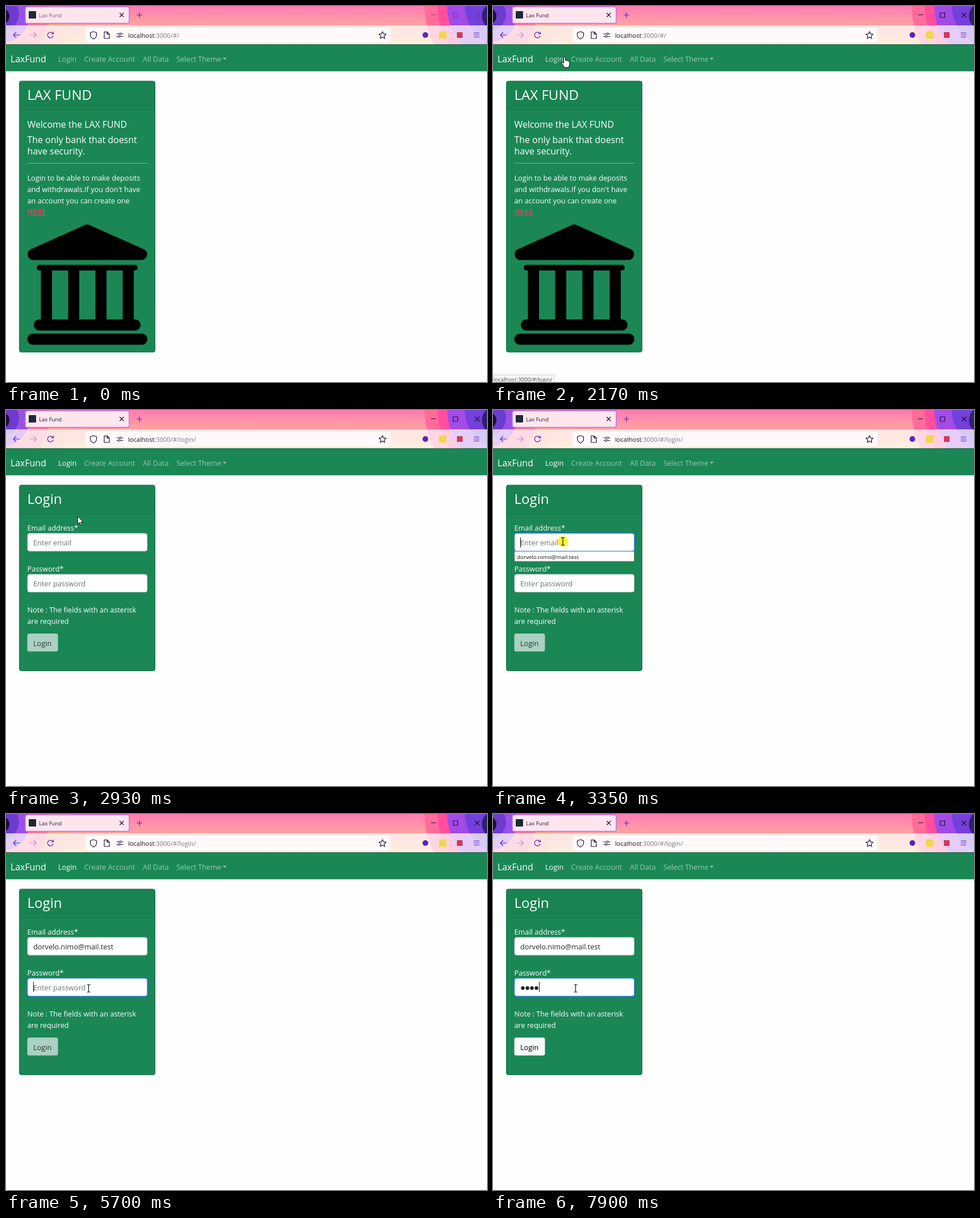
These frames come from a looping animation (847x661 px, 8 s). An HTML page:

```html
<!DOCTYPE html>
<html lang="en">
<head>
<meta charset="utf-8">
<title>Lax Fund</title>
<style>
  html, body { margin: 0; width: 100%; height: 100%; overflow: hidden; background: #fefefe; }
  svg { display: block; width: 847px; height: 661px; }
  text { font-family: "Open Sans", "Noto Sans", sans-serif; white-space: pre; }
  .line { fill: none; stroke-width: 1.2; stroke-linecap: round; stroke-linejoin: round; }
</style>
</head>
<body>
<svg id="stage" viewBox="0 0 847 661"></svg>
<script>
const LOOP = 8000;
const BASE = 12.7, TITLE = 15.9, HEAD = 24.1;
const GREEN = '#1b8755', PURPLE = '#5a22c0', INK = '#20123a';
const EMAIL = 'dorvelo.nimo@mail.test';

const text = (x, y, size, str, fill = '#fff', more = '') =>
  `<text x="${x}" y="${y}" font-size="${size}" fill="${fill}" ${more}>${str}</text>`;
const rect = (x, y, w, h, fill, r = 0, more = '') =>
  `<rect x="${x}" y="${y}" width="${w}" height="${h}" rx="${r}" fill="${fill}" ${more}/>`;
const circle = (x, y, r, fill, more = '') =>
  `<circle cx="${x}" cy="${y}" r="${r}" fill="${fill}" ${more}/>`;
const line = (d, color = PURPLE, more = '') => `<path class="line" d="${d}" stroke="${color}" ${more}/>`;
const group = (id, ...parts) => `<g id="${id}">${parts.join('')}</g>`;

const card = (height, title) =>
  rect(23.5, 132, 239, height, GREEN, 3.5, 'stroke="#15744a"') +
  rect(24, 132, 238, 50, '#000', 3, 'opacity=".03"') +
  rect(24, 182, 238, 1, '#17744a') +
  text(37.5, 165, HEAD, title);

const input = (id, y) =>
  rect(36, y - 1.5, 215, 35, '#146fc0', 5, `id="${id}Ring" opacity="0"`) +
  rect(38, y + .5, 210.5, 31, '#fff', 3.5, `id="${id}Box" stroke="#ced4da"`);

const chrome = [
  `<defs><linearGradient id="sky" x2="0" y2="1">
    <stop offset="0" stop-color="#ff7cb4"/><stop offset=".5" stop-color="#ffa3a0"/>
    <stop offset="1" stop-color="#ffc08c"/></linearGradient>
    <clipPath id="bar"><rect width="847" height="67.5"/></clipPath></defs>`,
  '<g clip-path="url(#bar)">',
  rect(0, 0, 847, 68, 'url(#sky)'),
  circle(-8, 14, 118, '#ffa48c'), circle(-8, 14, 84, '#ff7d9c'),
  circle(-8, 14, 50, '#9a50e4'), circle(-8, 14, 31, '#6d3bd0'), circle(-8, 18, 14, '#1c1038'),
  circle(880, 0, 143, '#ff6c9a'), circle(880, 0, 120, '#ff4f9c'),
  circle(880, 0, 103, '#a24be6'), circle(880, 0, 72, '#7440dc'), circle(862, 18, 24, '#33206e'),
  rect(0, 34, 847, 34, '#fff', 0, 'opacity=".72"'),
  '</g>',
  rect(34, 1.5, 183, 29, '#ffe6ee', 3, 'stroke="#b36cf0" stroke-width="1.4"'),
  rect(40, 9, 13, 13, '#1d2a33', 1),
  text(58, 20, 9.5, 'Lax Fund', INK, 'id="tabTitle"'),
  line('M200.5 12.5l6.5 6.5m0-6.5l-6.5 6.5', INK),
  line('M230.5 16h9m-4.5-4.5v9'),
  group('controls', line('M749 15.5h8M787.5 12h8v8h-8zM826 12l7.5 7.5m0-7.5l-7.5 7.5', 'currentColor', 'stroke-linecap="butt"')),
  line('M24 51H13m4.5-4.5L13 51l4.5 4.5'),
  line('M42.500 51h11m-4.500-4.500l4.500 4.500l-4.500 4.500', PURPLE, 'opacity=".4"'),
  line('M82.500 48.500a5 5 0 1 0 .500 4M83.500 45.500v3.500h-3.500'),
  rect(140, 38, 537, 26, '#fffaf9', 3),
  line('M154 45l5.500 2v4q0 4.500-5.500 7q-5.500-2.500-5.500-7v-4z', INK),
  line('M173 45.500h5l4 4v7.500h-9zm5 0v4h4', INK),
  line('M195 49h4.500m4 0h2.500M195 53.500h2m4 0h5', INK),
  circle(201.5, 49, 1.7, 'none', `stroke="${INK}"`), circle(199, 53.5, 1.7, 'none', `stroke="${INK}"`),
  text(215, 55.5, 11.08, '<tspan fill="#15141a">localhost</tspan>:3000/#/<tspan id="route">login/</tspan>', '#76767c'),
  line('M663 45l1.900 4.100l4.400.5l-3.300 3l.9 4.400l-3.900-2.200l-3.900 2.200l.9-4.400l-3.300-3l4.400-.5z', INK),
  circle(738.5, 51, 5, PURPLE),
  rect(762.5, 44.500, 13, 13, '#efd84a'),
  rect(794, 46, 10, 10, '#d33a54'),
  line('M824 47.500h9m-9 3.500h9m-9 3.500h9'),
];

const nav = [
  rect(0, 67.5, 847, 47.3, GREEN), rect(0, 67.5, 847, 1, '#176c45'),
  text(8, 99, TITLE, 'LaxFund'),
  text(92, 97.5, BASE, 'Login', '#fff', 'id="navLogin"'),
  text(137.5, 97.5, BASE, 'Create Account', '#fff', 'id="navCreate"'),
  text(241, 97.5, BASE, 'All Data', '#fff', 'opacity=".55"'),
  text(300, 97.5, BASE, 'Select Theme', '#fff', 'opacity=".55"'),
  '<path d="M381.500 91h7l-3.500 3.500z" fill="#fff" opacity=".55"/>',
];

const home = group('home',
  card(476.5, 'LAX FUND'),
  text(37.5, 214, TITLE, 'Welcome the LAX FUND'),
  text(37.5, 240.5, TITLE, 'The only bank that doesnt'),
  text(37.5, 260.5, TITLE, 'have security.'),
  rect(38, 276, 211, 1, '#fff', 0, 'opacity=".4"'),
  text(37.5, 306.5, BASE, 'Login to be able to make deposits'),
  text(37.5, 326.5, BASE, "and withdrawals.If you don't have"),
  text(37.5, 346.5, BASE, 'an account you can create one'),
  text(37.5, 366, 13, 'HERE', '#d9435a', 'font-weight="700" text-decoration="underline"'),
  '<path d="M47.500 446.500H239A10 10 0 0 0 243.500 428L147 385Q143 383 139 385L43 428A10 10 0 0 0 47.500 446.500Z"/>',
  rect(54, 455, 178, 10, '#000', 5),
  [61.5, 109.5, 157.5, 205.5].map(x => rect(x, 460, 19.5, 96, '#000')).join(''),
  rect(49, 551, 188, 19.5, '#000', 9.7),
  rect(37.5, 576, 211.5, 19.5, '#000', 9.7));

const login = group('login',
  card(326.5, 'Login'),
  text(37.5, 212, BASE, 'Email address*'),
  input('mail', 216.5),
  text(48, 238, BASE, '', '#212529', 'id="mailText"'),
  text(37.5, 283.5, BASE, 'Password*'),
  input('pass', 288.5),
  text(48, 309.5, BASE, 'Enter password', '#66786f', 'id="passHint"'),
  [0, 1, 2, 3].map(i => circle(52.5 + 8 * i, 306, 3.2, '#212529', `id="dot${i}"`)).join(''),
  rect(0, 0, 1, 18, '#111', 0, 'id="caret"'),
  group('drop',
    rect(38, 248.5, 210.5, 17.5, '#fff', 0, 'stroke="#8a8f8c"'),
    rect(39, 249.5, 208.5, 15.5, '#e0e0e6', 0, 'id="dropHover"'),
    text(42, 261.5, 9.8, EMAIL, '#111')),
  text(37.5, 355.5, BASE, 'Note : The fields with an asterisk'),
  text(37.5, 375.5, BASE, 'are required'),
  rect(37.5, 393, 54, 31.5, '#f8f9fa', 3.5, 'id="button"'),
  text(48, 414.5, BASE, 'Login', '#000', 'id="buttonText"'));

const overlay = [
  group('status',
    rect(-1, 648.5, 109.5, 14, '#f9f9fb', 0, 'stroke="#d0d0d6"'),
    text(1, 660, 9.65, 'localhost:3000/#/login/', '#444')),
  group('pointer',
    circle(0, 0, 9.5, '#ffeb1c', 'id="click" opacity=".85"'),
    '<path id="arrow" d="M0 0V14L3.200 11L5.400 16L7.500 15L5.300 10.300H9.800Z" fill="#fff" stroke="#000" stroke-width=".9"/>',
    '<path id="hand" d="M-1.500 1.500Q0-1 1.500 1.500V7Q3 5.500 4.200 7.200Q5.800 6.200 6.800 8Q9 7.500 9 10V13Q9 16 7 19H-.5Q-2 16-4.500 13Q-6 11-4.500 10Q-3.300 9.600-1.500 11.500Z" fill="#fff" stroke="#000"/>',
    '<path id="beam" class="line" d="M-2.500-6.500h2l.5.500l.5-.5h2M0-6V6M-2.500 6.500h2l.5-.5l.5.500h2" stroke="#111"/>'),
];

document.getElementById('stage').innerHTML =
  [...chrome, ...nav, home, login, ...overlay].join('');

const $ = id => document.getElementById(id);
const set = (id, name, value) => $(id).setAttribute(name, value);
const show = (id, on) => set(id, 'display', on ? 'inline' : 'none');
const ramp = (t, start, ms = 150) => Math.min(1, Math.max(0, (t - start) / ms));
const within = (t, ...spans) => spans.some(([a, b]) => t >= a && t < b);

// time, x, y; equal neighbours hold still
const path = [
  [260, 612, 580], [500, 440, 400], [760, 225, 190], [1020, 146, 111], [1289, 146, 111],
  [1290, 138, 106], [1480, 142, 97], [1710, 126, 89], [2370, 126, 89],
  [2700, 130, 135], [3140, 123, 231], [3620, 123, 231], [3830, 125, 257], [3990, 125, 257],
  [4220, 138, 299], [4420, 145.5, 306.5], [LOOP, 145.5, 306.5],
];

function pointerAt(t) {
  const i = Math.max(1, path.findIndex(p => p[0] > t));
  const [a, b] = [path[i - 1], path[i]];
  const k = ramp(t, a[0], b[0] - a[0]);
  const ease = k * k * (3 - 2 * k);
  return [a[1] + (b[1] - a[1]) * ease, a[2] + (b[2] - a[2]) * ease];
}

function focus(id, amount) {
  set(id + 'Ring', 'opacity', amount * .75);
  set(id + 'Box', 'stroke', amount > .3 ? '#6fa9f0' : '#ced4da');
}

function draw(t) {
  const onLogin = t >= 2370, filled = t >= 3960, inPass = t >= 4490, typed = t >= 5770;
  const active = t >= 1970;

  show('home', !onLogin);
  show('login', onLogin);
  show('route', onLogin);
  set('tabTitle', 'opacity', active ? 1 : .65);
  set('controls', 'color', active ? INK : '#5a3a9c');
  set('controls', 'opacity', active ? 1 : .75);
  set('navLogin', 'opacity', .55 + .2 * ramp(t, 1500) + .25 * ramp(t, 2370));
  set('navCreate', 'opacity', .55 + .2 * (ramp(t, 1300) - ramp(t, 1500)));
  show('status', within(t, [1570, 2560]));

  focus('mail', ramp(t, 3160) - ramp(t, 4490));
  focus('pass', ramp(t, 4490));
  $('mailText').textContent = filled ? EMAIL : 'Enter email';
  set('mailText', 'fill', filled ? '#212529' : '#66786f');
  show('drop', within(t, [3340, 3960]));
  show('dropHover', t >= 3760);

  const dots = [5770, 6040, 6440, 7900].filter(at => t >= at).length;
  for (let i = 0; i < 4; i++) show('dot' + i, i < dots);
  show('passHint', !typed);
  set('button', 'opacity', typed ? 1 : .65);
  set('buttonText', 'opacity', typed ? 1 : .75);

  show('caret', within(t, [3210, 5170], [5700, 6240], [6440, 6770], [7300, 7830], [7900, LOOP]));
  set('caret', 'x', inPass ? 48 + Math.round(8.2 * dots) : filled ? 190.5 : 48);
  set('caret', 'y', inPass ? 295 : 224);

  const [x, y] = pointerAt(t);
  const hand = within(t, [1290, 2480]);
  const beam = (onLogin && y > 217 && y < 249) || y > 288 && t > 3900;
  show('pointer', t >= 260);
  set('pointer', 'transform', `translate(${x.toFixed(1)} ${y.toFixed(1)})`);
  show('hand', hand);
  show('beam', beam);
  show('arrow', !hand && !beam);
  show('click', within(t, [1970, 2170], [3210, 3420], [3880, 4020], [4490, 4760]));
}

function tick() {
  draw(performance.now() % LOOP);
  requestAnimationFrame(tick);
}
tick();
</script>
</body>
</html>
```
